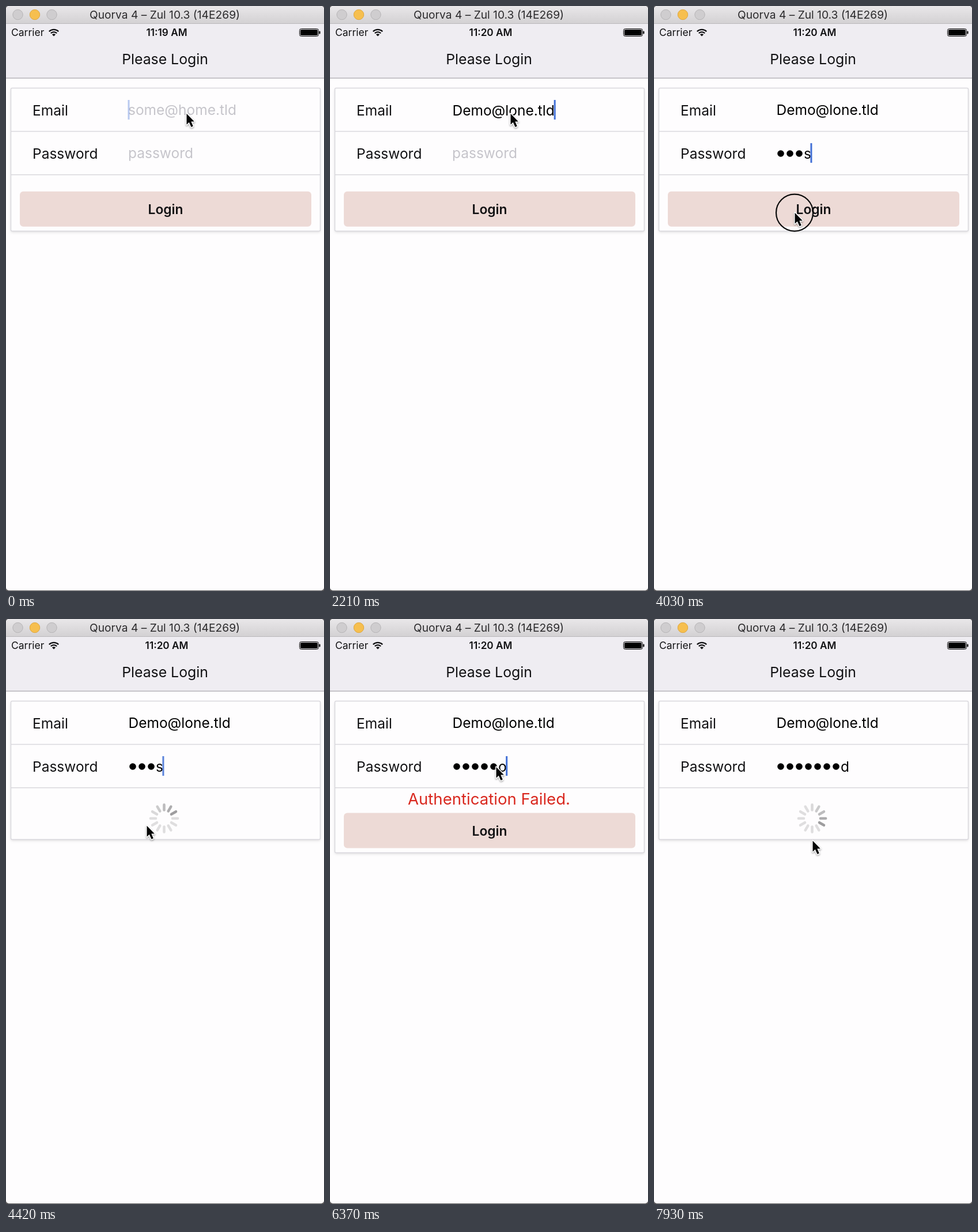
An HTML page with a canvas that plays this animation: 552 px wide and 1015 px high, repeating every 8000 ms.

```html
<!DOCTYPE html>
<html lang="en">
<head>
<meta charset="utf-8">
<title>Login form</title>
<style>
  html, body { margin: 0; width: 100%; height: 100%; overflow: hidden; background: #fefdfe; }
  canvas { display: block; width: 100%; height: 100%; }
</style>
</head>
<body>
<canvas id="stage"></canvas>
<script>
const W = 552, H = 1015, LOOP = 8000, TICK = 130;
const FONT = 'Inter, Roboto, "Open Sans", sans-serif';
const INK = '#111113', LINE = '#d9d8dd', HINT = '#c6c5cb';
const BODY = 24.5;

const canvas = document.getElementById('stage');
const ratio = Math.max(1, window.devicePixelRatio || 1);
canvas.width = W * ratio;
canvas.height = H * ratio;
const c = canvas.getContext('2d');
c.scale(ratio, ratio);

const email = { text: 'Demo@lone.tld', hint: 'some@home.tld', start: 760, step: 105 };

// One entry per login attempt: key times, clearing, and the spinner's window.
const attempts = [
  { text: 'pass', keys: [3250, 3380, 3510, 3640], spin: [4160, 4500], spinAt: 4420, spoke: 2 },
  { text: 'password', keys: [5680, 5810, 5940, 6070, 6200, 6330, 6430, 6505],
    spin: [7600, LOOP], spinAt: 7930, spoke: 4 }
];

// Pointer moves: [start, end, x, y]
const moves = [
  [0, 0, 313, 186],
  [2340, 2590, 266, 258],
  [3770, 4020, 244, 358],
  [4680, 5070, 288, 256],
  [6630, 7150, 275, 384]
];
const clicks = [[2600, 2760], [4030, 4155], [5100, 5300], [7400, 7560]];

const within = (t, [a, b]) => t >= a && t < b;

function text(str, x, y, size = BODY, color = INK, weight = 400, align = 'left') {
  c.font = `${weight} ${size}px ${FONT}`;
  c.textAlign = align;
  c.fillStyle = color;
  c.fillText(str, x, y);
  return c.measureText(str).width;
}

function rect(x, y, w, h, color) {
  c.fillStyle = color;
  c.fillRect(x, y, w, h);
}

function box(x, y, w, h, r) {
  c.beginPath();
  c.roundRect(x, y, w, h, r);
}

function disc(x, y, r, fill, stroke) {
  c.beginPath();
  c.arc(x, y, r, 0, Math.PI * 2);
  c.fillStyle = fill;
  c.fill();
  if (stroke) {
    c.strokeStyle = stroke;
    c.lineWidth = 1;
    c.stroke();
  }
}

function titleBar() {
  const g = c.createLinearGradient(0, 0, 0, 30);
  g.addColorStop(0, '#e9e7e9');
  g.addColorStop(1, '#d3d1d3');
  rect(0, 0, W, 30, g);
  rect(0, 30, W, 1, '#bbb9bc');
  disc(20.5, 15, 8.7, '#cfcdcf', '#b6b4b6');
  disc(50, 15, 8.7, '#f6bf4f', '#dea740');
  disc(79.5, 15, 8.7, '#cfcdcf', '#b6b4b6');
  text('Quorva 4 – Zul 10.3 (14E269)', 275.5, 22, 19.2, '#2b2a2c', 400, 'center');
}

function wifi(x, y) {
  const from = -Math.PI * 0.75, to = -Math.PI * 0.25;
  c.fillStyle = c.strokeStyle = INK;
  c.beginPath();
  c.moveTo(x, y);
  c.arc(x, y, 4.3, from, to);
  c.fill();
  c.lineWidth = 2.3;
  for (const r of [7.4, 11.6]) {
    c.beginPath();
    c.arc(x, y, r, from, to);
    c.stroke();
  }
}

function navBar(t) {
  rect(0, 31, W, 94, '#efedf2');
  rect(0, 124.5, W, 1.3, '#adacb1');
  text('Carrier', 9, 52, 17.5);
  wifi(83, 52.5);
  text(t < 1040 ? '11:19 AM' : '11:20 AM', 279, 52, 17.2, INK, 600, 'center');
  box(509.5, 39.5, 33, 13, 3);
  c.strokeStyle = '#000';
  c.lineWidth = 1;
  c.stroke();
  box(511, 41, 30, 10, 1.5);
  c.fillStyle = '#000';
  c.fill();
  box(543.5, 43.5, 2, 5, 1);
  c.fill();
  text('Please Login', 276, 101, 24.8, INK, 400, 'center');
}

function card(bottom) {
  box(8.5, 142.5, 537, bottom - 142, 2);
  c.save();
  c.shadowColor = 'rgba(0,0,0,.13)';
  c.shadowBlur = 4 * ratio;
  c.shadowOffsetY = 2 * ratio;
  c.fillStyle = '#fefdfe';
  c.fill();
  c.restore();
  c.strokeStyle = LINE;
  c.lineWidth = 1.5;
  c.stroke();
  rect(9, 216.8, 536, 1.5, LINE);
  rect(9, 292, 536, 1.5, LINE);
  text('Email', 46, 190);
  text('Password', 46, 265);
}

function button(y) {
  box(24, y, 506, 61, 6);
  c.fillStyle = '#eddad6';
  c.fill();
  text('Login', 277, y + 39, 22.8, INK, 600, 'center');
}

// Solid, fade out, short gap, fade in.
function caret(x, y, since) {
  const p = since % 800;
  const alpha = p < 450 ? 1 : p < 600 ? 1 - (p - 450) / 150 : p < 650 ? 0 : (p - 650) / 150;
  c.globalAlpha = alpha;
  rect(x - 1.5, y, 3, 34, '#4270d6');
  c.globalAlpha = 1;
}

function emailField(t) {
  const { text: full, hint, start, step } = email;
  const n = t < start ? 0 : Math.min(full.length, Math.floor((t - start) / step) + 1);
  const focused = t < 2700;
  const w = n ? text(full.slice(0, n), 212.5, focused ? 190 : 189, BODY, '#000') : 0;
  if (!n) text(hint, 212, 189, BODY, HINT);
  if (focused) caret(213 + w, 163, n ? Math.max(0, t - start - (n - 1) * step) : t + 545);
}

function passwordField(t) {
  const run = attempts[t < 4500 ? 0 : 1];
  const n = run.keys.filter(k => k <= t).length;
  if (!n) {
    text('password', 212, 264, BODY, HINT);
    if (within(t, [2700, 4500])) caret(213, 238, t - 2545);
    if (t >= 5300) caret(213, 238, t - 5300);
    return;
  }
  for (let i = 0; i < n - 1; i++) disc(220 + i * 16, 256, 5.8, '#000');
  const x = 212 + (n - 1) * 16;
  const w = text(run.text[n - 1], x, 265, BODY, '#000');
  caret(x + w, 238, t - run.keys[n - 1]);
}

function spinner(x, y, head) {
  c.lineCap = 'round';
  c.lineWidth = 4.6;
  for (let i = 0; i < 12; i++) {
    const behind = ((head - i) % 12 + 12) % 12;
    const a = i * Math.PI / 6;
    const dx = Math.sin(a), dy = -Math.cos(a);
    c.strokeStyle = `rgba(0,0,5,${Math.max(0.12, 0.38 - behind * 0.06)})`;
    c.beginPath();
    c.moveTo(x + dx * 14.5, y + dy * 14.5);
    c.lineTo(x + dx * 23.6, y + dy * 23.6);
    c.stroke();
  }
  c.lineCap = 'butt';
}

function pointerAt(t) {
  let [, , x, y] = moves[0];
  for (const [a, b, nx, ny] of moves.slice(1)) {
    if (t < a) break;
    const p = Math.min(1, (t - a) / (b - a));
    const e = p * p * (3 - 2 * p);
    x += (nx - x) * e;
    y += (ny - y) * e;
  }
  return [x, y];
}

function pointer(t) {
  const [x, y] = pointerAt(t);
  if (clicks.some(span => within(t, span))) {
    c.beginPath();
    c.arc(x, y + 0.7, 32, 0, Math.PI * 2);
    c.strokeStyle = '#0a0a0a';
    c.lineWidth = 2.2;
    c.stroke();
  }
  const shape = [[0, 0], [0, 19], [4.3, 15], [8, 23.2], [11.3, 21.8], [7.8, 13.8], [13.4, 13.6]];
  c.save();
  c.translate(x + 0.5, y + 0.8);
  c.beginPath();
  shape.forEach(([px, py]) => c.lineTo(px, py));
  c.closePath();
  c.lineJoin = 'round';
  c.lineWidth = 3;
  c.strokeStyle = '#fff';
  c.shadowColor = 'rgba(0,0,0,.35)';
  c.shadowBlur = 3 * ratio;
  c.shadowOffsetY = 1.5 * ratio;
  c.stroke();
  c.shadowColor = 'transparent';
  c.fillStyle = '#050505';
  c.fill();
  c.restore();
}

function draw(t) {
  rect(0, 0, W, H, '#555456');
  c.save();
  box(0, 0, W, H - 1, 5);
  c.clip();
  rect(0, 0, W, H, '#fefdfe');
  titleBar();
  navBar(t);

  const busy = attempts.find(a => within(t, a.spin));
  const failed = !busy && t >= attempts[0].spin[1];
  card(busy ? 382 : failed ? 405 : 390);
  emailField(t);
  passwordField(t);
  if (busy) {
    spinner(274.5, 346, busy.spoke + Math.round((t - busy.spinAt) * 12 / 1000));
  } else {
    if (failed) text('Authentication Failed.', 276, 322, 27.6, '#d9281f', 400, 'center');
    button(failed ? 336.5 : 321.8);
  }
  pointer(t);
  c.restore();
}

function frame(now) {
  const t = now % LOOP;
  draw(Math.floor(t / TICK) * TICK);
  requestAnimationFrame(frame);
}
draw(0);
requestAnimationFrame(frame);
</script>
</body>
</html>
```
